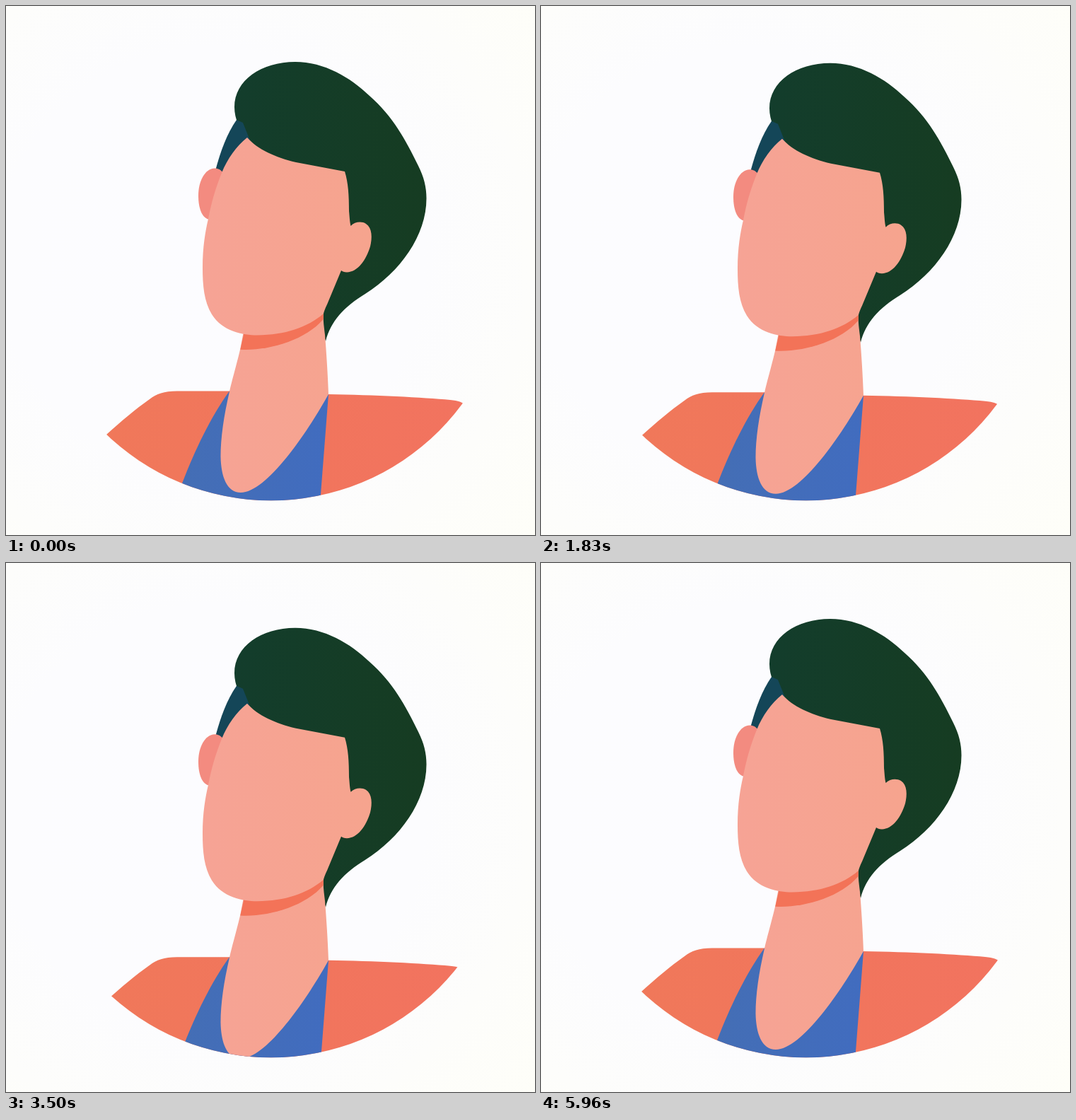
An HTML page with a canvas that plays this animation: 748x748 px, repeating every 6000 ms.

```html
<!DOCTYPE html>
<html lang="en">
<head>
<meta charset="utf-8">
<title>Portrait</title>
<style>
  html, body { margin: 0; width: 100%; height: 100%; overflow: hidden; background: #fdfdfe; }
  canvas { display: block; width: 748px; height: 748px; }
</style>
</head>
<body>
<canvas id="stage" width="748" height="748"></canvas>
<script>
const SIZE = 748;
const LOOP = 6000;
const BOB = 2000;   // one down-and-up movement
const DEPTH = 25.6; // travel in pixels
const FPS = 24;

const ctx = document.getElementById('stage').getContext('2d');

function across(x0, x1, from, to) {
  const g = ctx.createLinearGradient(x0, 0, x1, 0);
  g.addColorStop(0, from);
  g.addColorStop(1, to);
  return g;
}

const backdrop = ctx.createRadialGradient(290, 360, 0, 290, 360, 600);
backdrop.addColorStop(0, '#fcfcff');
backdrop.addColorStop(0.5, '#fcfcfe');
backdrop.addColorStop(1, '#fefef8');

const hairFill = across(323, 594, '#133d2c', '#163c22');
const skinFill = across(278, 517, '#f6a395', '#f6a48e');

// Painted from back to front.
const layers = [
  [across(142, 646, '#f0785a', '#f2735f'),
    'M135 613 L142 606 C163 587 183 570 203 556 C213 548.5 223 544.5 242 544.5 L316 544.5 ' +
    'L456 549 C520 550 590 553.5 628 557 C640 558 645 560 650 565 L690 720 L135 720 Z'],
  [across(249, 456, '#446eb5', '#416cbf'),
    'M316 544.5 C290 580 267 628 249 675 L238 706 L443.5 710 L456 549 Z'],
  [hairFill,
    'M323 143 C323 105 361 79 409 79 C450 79 487 101 514 127 C547 156 565 189 583 226 ' +
    'C591 242 594.5 256 594.5 272 C594.5 325 557 376 508 407 C478 425 459 446 452 474 ' +
    'L440 440 L400 260 L341 186 C331 176 323 160 323 143 Z'],
  [skinFill,
    'M336 460 L331 486 C325 511 319 531 316 545 C308 580 303.5 610 303.5 637 ' +
    'C304 665 312 688 332 688 C368 688 425 605 456 549 C455 520 453 490 451 465 ' +
    'C450 455 448 445 449 432 Z'],
  ['#f37358', 'M337 460 L331.3 485.7 C370 488 423 473 448.6 443 L449 432 Z'],
  ['#144658', 'M326 161 C312 181 303 207 296.5 231 L307 240 L345 190 L335 165 Z'],
  ['#f38b80',
    'M307 235.5 C303 231 299 229.5 295 229.5 C281 230 272 248 272 268 ' +
    'C272 286 277 299 286 301.5 L300 290 Z'],
  [skinFill,
    'M341 186 C356 203 381 214 410 221 L479 234 C484 250 485 268 485 290 ' +
    'C486 300 486 305 487.5 311 C493 305 503 304 509 308 C518 314 518 328 515 340 ' +
    'C509 360 497 376 482 376.5 C478 376.5 476 375.5 474 374 L454 422 ' +
    'C451 428 449.5 433 449 435 C425 455 395 465 355 465.5 C335 465.5 306 460 291 436 ' +
    'C280 418 278 395 278 370 C278 340 282 318 286 301 C291 275 297 256 305 236 ' +
    'C313 216 326 198 341 186 Z']
].map(([fill, d]) => [fill, new Path2D(d)]);

const frame = new Path2D();
frame.arc(374.6, 363.3, 336, 0, Math.PI * 2);

function draw(ms) {
  const drop = DEPTH * (1 - Math.cos(2 * Math.PI * ms / BOB)) / 2;
  ctx.fillStyle = backdrop;
  ctx.fillRect(0, 0, SIZE, SIZE);
  ctx.save();
  ctx.clip(frame);
  ctx.translate(0, drop);
  for (const [fill, path] of layers) {
    ctx.fillStyle = fill;
    ctx.fill(path);
  }
  ctx.restore();
}

const start = performance.now();

function tick() {
  const t = (performance.now() - start) % LOOP;
  const step = Math.floor((t + 4.9) * FPS / 1000);
  draw(step * 1000 / FPS);
  requestAnimationFrame(tick);
}
tick();
</script>
</body>
</html>
```
